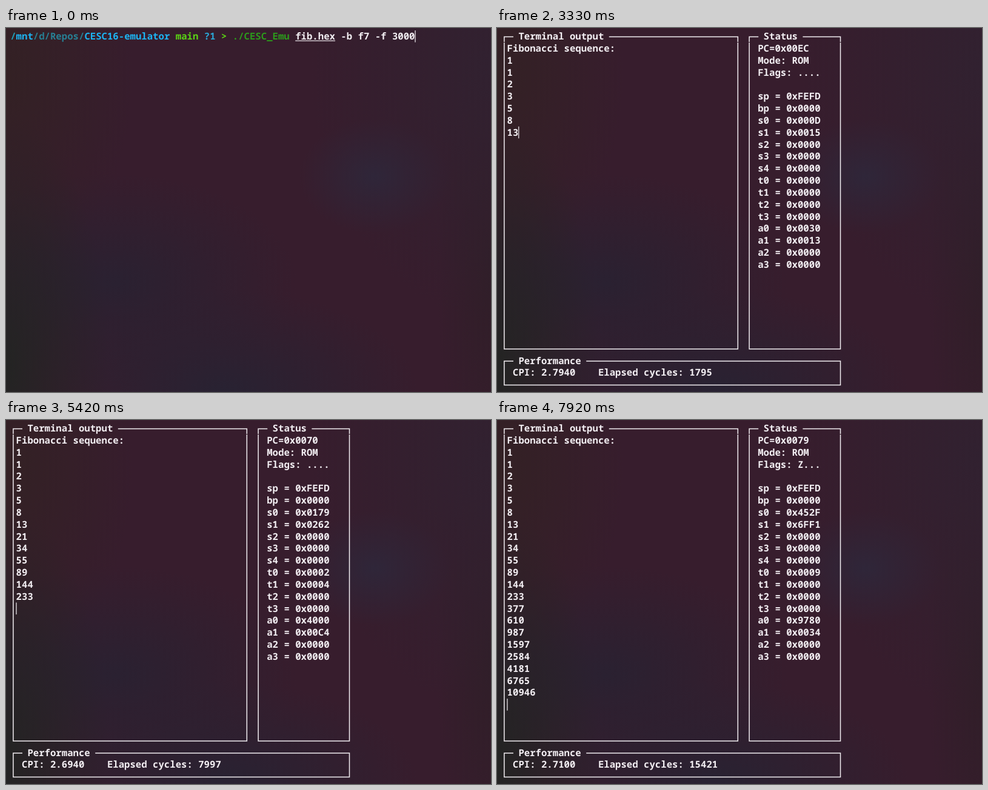
Recreate the animation shown at these times as an HTML page with a canvas. Size 800x601 px, loop 8 s.

```html
<!DOCTYPE html>
<html lang="en">
<head>
<meta charset="utf-8">
<title>CESC16 emulator</title>
<style>
html, body { margin: 0; width: 100%; height: 100%; overflow: hidden; }
body {
  background:
    radial-gradient(ellipse 125px 95px at 608px 245px, #2f2639, #2f263900),
    radial-gradient(ellipse 170px 420px at 0 560px, #232423, #23242300),
    radial-gradient(ellipse 210px 330px at 0 80px, #332124, #33212400),
    radial-gradient(ellipse 300px 180px at 180px 420px, #2a2131, #2a213100),
    radial-gradient(ellipse 320px 170px at 360px 601px, #282232, #28223200),
    radial-gradient(ellipse 300px 420px at 800px 60px, #312130, #31213000),
    radial-gradient(ellipse 90px 400px at 800px 400px, #301e28, #301e2800),
    #371d2d;
}
canvas { display: block; }
</style>
</head>
<body>
<canvas id="screen" width="800" height="601"></canvas>
<script>
const ctx = document.getElementById('screen').getContext('2d');
const CELL = 9.4, LINE = 19.83, LEFT = 7.2, WHITE = '#f2eef2';
const LOOP = 8000, LAST = 95;
const TITLE = 'Fibonacci sequence:';

const PROMPT = [
  ['/', '#20a0b8'], ['mnt', '#1cb4f2'], ['/d/Repos/', '#277f93'],
  ['CESC16-emulator', '#1cb4f2'], [' main', '#5ad414'], [' ?1', '#2aa6d6'],
  [' >', '#5ad414'], [' ./CESC_Emu', '#2c9a1c'], [' fib.hex -b f7 -f 3000', WHITE]
];

// tick (1/12 s), elapsed cycles, CPI
const CLOCK = [
  [33, 31, 2.8182], [48, 3810, 2.728], [57, 6032, 2.688],
  [73, 9961, 2.7], [82, 12302, 2.752], [95, 15421, 2.71]
];
// cycles spent on a number, by its digit count
const COST = [0, 75, 904, 946, 964, 1024];
const START = 498, SHIFT = 45;

const colX = col => LEFT + col * CELL;
const hex = n => '0x' + (n & 0xffff).toString(16).toUpperCase().padStart(4, '0');
const bcd = n => parseInt(String(n), 16);
const add3 = n => parseInt([...n.toString(16)].map(d => (d > 4 ? +d + 3 : +d).toString(16)).join(''), 16);

function write(text, col, row, color = WHITE) {
  ctx.fillStyle = color;
  ctx.fillText(text, colX(col), 19.1 + row * LINE);
}

function cursor(col, row) {
  ctx.fillStyle = WHITE;
  ctx.fillRect(colX(col) - 0.2, 4 + row * LINE, 1.2, 19.6);
}

function panel(title, c1, r1, c2, r2) {
  const [x1, x2] = [c1, c2].map(c => colX(c + 0.5));
  const [y1, y2] = [r1, r2].map(r => 14.5 + r * LINE);
  ctx.strokeStyle = WHITE;
  ctx.lineWidth = 1.5;
  ctx.beginPath();
  ctx.moveTo(colX(c1 + 2) + 1, y1);
  ctx.lineTo(x1, y1);
  ctx.lineTo(x1, y2);
  ctx.lineTo(x2, y2);
  ctx.lineTo(x2, y1);
  ctx.lineTo(colX(c1 + 4 + title.length) - 1, y1);
  ctx.stroke();
  write(title, c1 + 3, r1);
}

function clock(tick) {
  if (tick < CLOCK[0][0]) return [0, 0];
  const i = Math.min(CLOCK.findLastIndex(c => c[0] <= tick), CLOCK.length - 2);
  const [a, b] = [CLOCK[i], CLOCK[i + 1]];
  const u = (tick - a[0]) / (b[0] - a[0]);
  const mix = n => a[n] + (b[n] - a[n]) * u;
  const cpi = mix(2) + 0.03 * Math.sin(u * Math.PI * 6);
  return [Math.round(mix(1)), u % 1 ? Math.round(cpi * 500) / 500 : cpi];
}

// Machine state after a number of cycles: double dabble, then digit output
function machine(cycles) {
  const m = { lines: [], partial: '', blink: false, pc: 0xec, z: false, sp: 0xfefe,
              s0: 0, s1: 0, t0: 2, t1: 0, a0: 0xe0, a1: 0 };
  if (cycles < START) {
    const n = Math.max(0, Math.floor((cycles - 38) / 23));
    m.partial = TITLE.slice(0, n);
    m.a0 += n;
    if (n) m.t0 = TITLE.charCodeAt(n - 1);
    return m;
  }
  m.lines.push(TITLE);
  let x = 1, y = 1, left = cycles - START, cost;
  while (left >= (cost = COST[String(x).length])) {
    m.lines.push(x);
    left -= cost;
    [x, y] = [y, x + y];
  }
  Object.assign(m, { s0: x, s1: y, sp: 0xfefd });
  const digits = String(x), busy = x < 10 ? 0 : 16 * SHIFT;
  if (left < busy) {
    const step = Math.floor(left / SHIFT), part = left / SHIFT - step;
    const shifted = part >= 0.8;
    const shifts = step + shifted, value = bcd(x >> (16 - shifts));
    m.t0 = 16 - step;
    m.t1 = part < 0.6 ? value & 15 : 0;
    m.a0 = x << shifts;
    m.a1 = shifted ? value : add3(value);
    m.z = !m.t1;
    m.pc = shifted ? 0x7f : part >= 0.6 ? 0x79 : m.t1 ? 0x70 : 0x71;
    m.blink = left < 3.5 * SHIFT;
  } else {
    const n = Math.floor((left - busy) / (cost - busy) * (digits.length + 1));
    m.partial = digits.slice(0, n);
    m.t0 = 0;
    m.a0 = 48 + +(digits[n] || 0);
    m.a1 = bcd(x);
  }
  return m;
}

function drawShell(entered) {
  let col = 0;
  for (const [text, color] of PROMPT) {
    write(text, col, 0, color);
    col += text.length;
  }
  ctx.fillRect(colX(50), 20.5, 7 * CELL, 1.2);
  entered ? cursor(0, 1) : cursor(col, 0);
}

function drawEmulator(tick) {
  const [cycles, cpi] = clock(tick), m = machine(cycles);
  panel('Terminal output', 0, 0, 41, 26);
  panel('Status', 43, 0, 59, 26);
  if (tick > CLOCK[0][0])
    for (const c of [0, 41, 43, 59]) ctx.clearRect(colX(c + 0.5) - 2, 22.5, 4, 1.8);
  panel('Performance', 0, 27, 59, 29);

  [...m.lines, m.partial].forEach((line, i) => write(line, 1, i + 1));
  if (!m.blink) cursor(1 + m.partial.length, m.lines.length + 1);

  write('PC=' + hex(m.pc), 45, 1);
  write('Mode: ROM', 45, 2);
  write('Flags: ' + (m.z ? 'Z' : '.') + '...', 45, 3);
  'sp bp s0 s1 s2 s3 s4 t0 t1 t2 t3 a0 a1 a2 a3'.split(' ')
    .forEach((reg, i) => write(`${reg} = ${hex(m[reg] || 0)}`, 45, 5 + i));
  write(`CPI: ${cpi.toFixed(4)}    Elapsed cycles: ${cycles}`, 2, 28);
}

function draw(now) {
  const tick = Math.min(LAST, Math.floor((now % LOOP + 5) * 0.012));
  ctx.clearRect(0, 0, 800, 601);
  ctx.font = '600 15.667px "Noto Sans Mono", "DejaVu Sans Mono", monospace';
  ctx.textRendering = 'geometricPrecision';
  if (tick < 31) drawShell(tick === 30);
  else if (tick === 31) cursor(0, 0);
  else drawEmulator(tick);
}

const begin = performance.now();
function loop() {
  draw(performance.now() - begin);
  requestAnimationFrame(loop);
}
loop();
</script>
</body>
</html>
```
